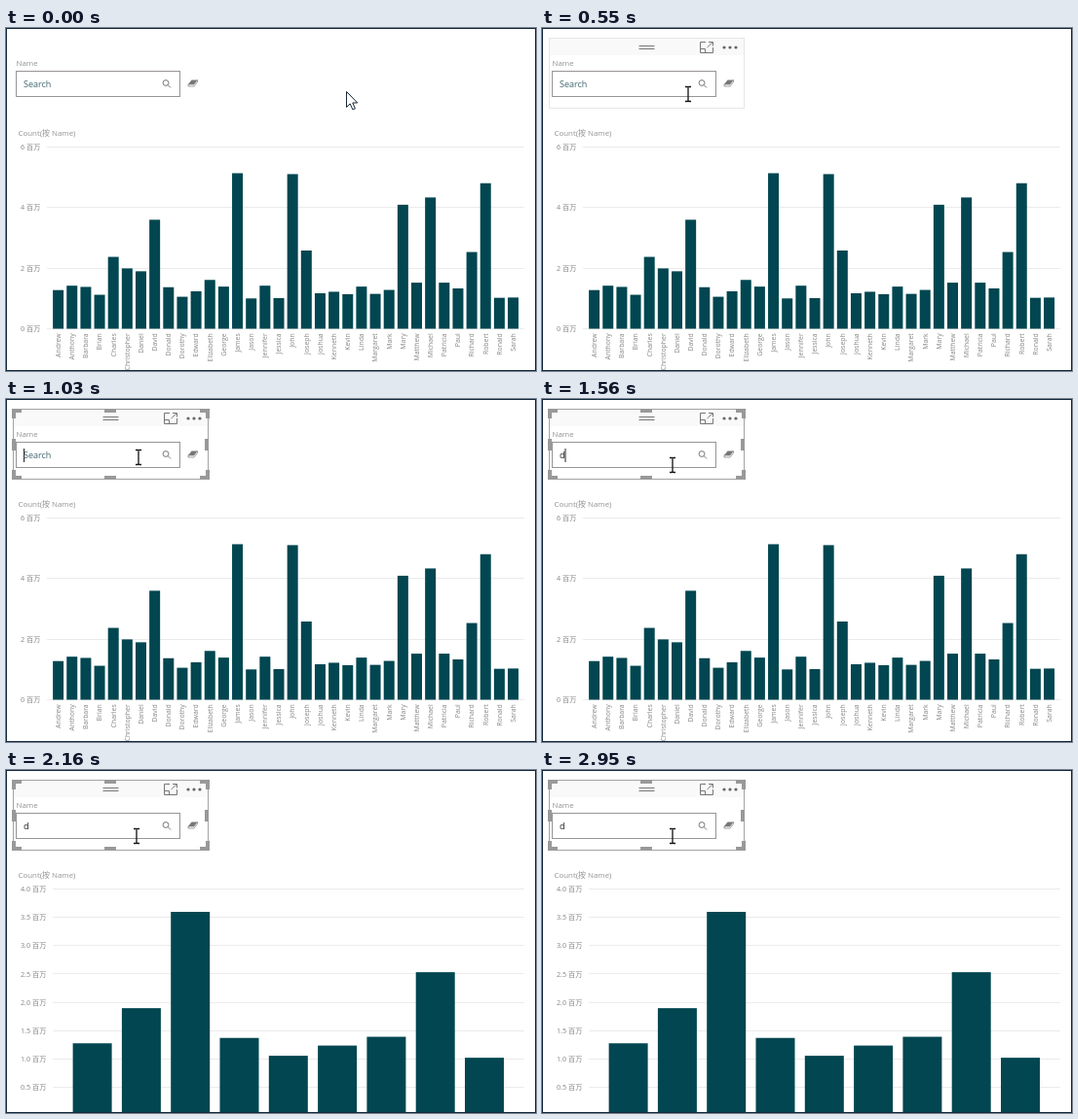
An HTML page that plays this animation: 544 by 353 pixels, repeating every 3.21 s.

```html
<!DOCTYPE html>
<html lang="zh">
<head>
<meta charset="utf-8">
<title>Search filter</title>
<style>
  html, body { margin: 0; width: 100%; height: 100%; overflow: hidden; background: #fff; }
  svg { display: block; width: 544px; height: 353px; }
  text { font-family: "Open Sans", "Noto Sans CJK SC", "Noto Sans CJK", sans-serif; fill: #858585; }
  .title { font-size: 7.9px; fill: #929292; }
  .axis { font-size: 7.2px; }
  .name { font-size: 6.9px; text-anchor: end; }
  .input { font-size: 9px; fill: #3f646d; }
  .typed { font-size: 9.4px; fill: #252525; }
  .grid { stroke: #ebebeb; }
  .bar { fill: #014650; }
  .line { fill: none; stroke: #777; }
  .grip { fill: #999; }
</style>
</head>
<body>
<svg id="stage" viewBox="0 0 544 353">
  <rect width="544" height="353" fill="#fff"/>
  <g id="all"></g>
  <g id="filtered"></g>
  <text class="title" x="12.5" y="111">Count(按 Name)</text>
  <rect id="dot" y="95" width="2" height="2" fill="#333"/>

  <g id="header">
    <rect x="7.5" y="10.5" width="200" height="72" fill="#fff" stroke="#e6e6e6"/>
    <rect x="8" y="11" width="199" height="17" fill="#f9f9f9"/>
    <path class="line" d="M99.5 18.5H115.5M99.5 21.5H115.5"/>
    <path class="line" d="M168 14.5H162.5V25.5H175.5V20M162.5 21.5H167.5V25.5M169.5 20L175 14.8M171 14.5H175.5V18.5"/>
    <g fill="#666">
      <circle cx="187" cy="20" r="1.6"/>
      <circle cx="193" cy="20" r="1.6"/>
      <circle cx="199" cy="20" r="1.6"/>
    </g>
  </g>
  <g id="selection">
    <rect x="7.5" y="10.5" width="200" height="72" fill="none" stroke="#a3a3a3"/>
    <path class="grip" d="M6 10H16V14H10V20H6ZM209 10H199V14H205V20H209ZM6 83H16V79H10V73H6ZM209 83H199V79H205V73H209Z"/>
    <path class="grip" d="M101 10H113V14H101ZM101 79H113V83H101ZM6 41H10V53H6ZM204 41H208V53H204Z"/>
  </g>

  <text class="title" x="10.5" y="39">Name</text>
  <rect x="10.5" y="44.5" width="168" height="26" fill="#fff" stroke="#989498"/>
  <text id="hint" class="input" x="18" y="61">Search</text>
  <text id="typed" class="typed" x="18" y="61">d</text>
  <rect id="caret" y="51" width="1" height="14" fill="#222"/>
  <g class="line">
    <circle cx="164" cy="56.5" r="2.9"/>
    <path d="M166.2 58.7L169 61.5"/>
  </g>
  <path d="M190.5 53.5H196.5L193 58H187Z" fill="#777"/>
  <path d="M187 58H193L196.5 53.5V55.5L193 60H187Z" fill="#fff" stroke="#777" stroke-width=".7"/>

  <path id="arrow" d="M.5 .5V16.5L4.2 13L6.9 19L9.4 17.9L6.8 12H11.7Z" fill="#fff" stroke="#152536"/>
  <path id="beam" d="M-3 -7.5H-.8L0 -7L.8 -7.5H3M0 -7V7M-3 7.5H-.8L0 7L.8 7.5H3" fill="none" stroke="#111" stroke-width="1.3"/>
  <rect x=".5" y=".5" width="543" height="352" fill="none" stroke="#10293d"/>
</svg>
<script>
const LOOP = 3210;
const $ = id => document.getElementById(id);

// Counts in millions
const counts = {
  Andrew: 1.275, Anthony: 1.42, Barbara: 1.38, Brian: 1.12, Charles: 2.37, Christopher: 1.99,
  Daniel: 1.895, David: 3.595, Donald: 1.37, Dorothy: 1.055, Edward: 1.235, Elizabeth: 1.61,
  George: 1.39, James: 5.13, Jason: 1, Jennifer: 1.42, Jessica: 1.01, John: 5.1, Joseph: 2.58,
  Joshua: 1.17, Kenneth: 1.22, Kevin: 1.14, Linda: 1.39, Margaret: 1.15, Mark: 1.28, Mary: 4.09,
  Matthew: 1.52, Michael: 4.33, Patricia: 1.52, Paul: 1.33, Richard: 2.53, Robert: 4.8,
  Ronald: 1.02, Sarah: 1.03
};

function add(parent, tag, attrs, text = "") {
  const el = document.createElementNS("http://www.w3.org/2000/svg", tag);
  for (const key in attrs) el.setAttribute(key, attrs[key]);
  el.textContent = text;
  parent.append(el);
}

function drawChart(group, names, o) {
  const y = value => o.zero - value * o.unit;
  for (let v = o.min; v <= o.max; v += o.tick) {
    const line = Math.floor(y(v)) + .5;
    add(group, "line", { class: "grid", x1: o.left, x2: 532, y1: line, y2: line });
    add(group, "text", { class: "axis", x: 15, y: y(v) + 2.7 }, v.toFixed(o.digits) + " 百万");
  }
  names.forEach((name, i) => {
    const x = o.x + i * o.pitch, top = y(counts[name]);
    add(group, "rect", { class: "bar", x, y: top, width: o.width, height: o.zero - top });
    if (o.labels) {
      const at = `translate(${x + o.width / 2 + 2.3} 314.3) rotate(-90)`;
      add(group, "text", { class: "name", transform: at }, name);
    }
  });
}

const names = Object.keys(counts);
drawChart($("all"), names, {
  zero: 309.5, unit: 31.2, min: 0, max: 6, tick: 2, digits: 0,
  left: 42, x: 48.1, pitch: 14.15, width: 11, labels: true
});
drawChart($("filtered"), names.filter(name => /d/i.test(name)), {
  zero: 355.6, unit: 58.3, min: .5, max: 4, tick: .5, digits: 1,
  left: 48, x: 68.6, pitch: 50.3, width: 40
});

// Pointer stops: time, x, y
const stops = [
  [0, 349, 65], [270, 341, 69], [340, 305, 78], [410, 250, 81], [480, 190, 76],
  [550, 150, 68], [620, 141, 63], [690, 136, 60], [1360, 134, 68]
];

const show = (id, on) => $(id).setAttribute("visibility", on ? "visible" : "hidden");
const within = (t, from, to = LOOP) => t >= from && t < to;

function render(t) {
  const [, x, y] = stops.findLast(stop => stop[0] <= t);
  const inField = t >= 550;
  show("arrow", !inField);
  show("beam", inField);
  $(inField ? "beam" : "arrow").setAttribute("transform", `translate(${x} ${y})`);

  show("header", t >= 480);
  show("selection", t >= 890);
  show("hint", t < 1560);
  show("typed", t >= 1560);
  show("caret", within(t, 890, 1360) || within(t, 1560, 2160) || within(t, 2490, 2950));
  $("caret").setAttribute("x", t < 1560 ? 18 : 23.5);

  show("dot", within(t, 2020, 2160));
  $("dot").setAttribute("x", t < 2090 ? 11 : 15);
  show("all", t < 2160);
  show("filtered", t >= 2160);
}

function loop() {
  render(performance.now() % LOOP);
  requestAnimationFrame(loop);
}
loop();
</script>
</body>
</html>
```
